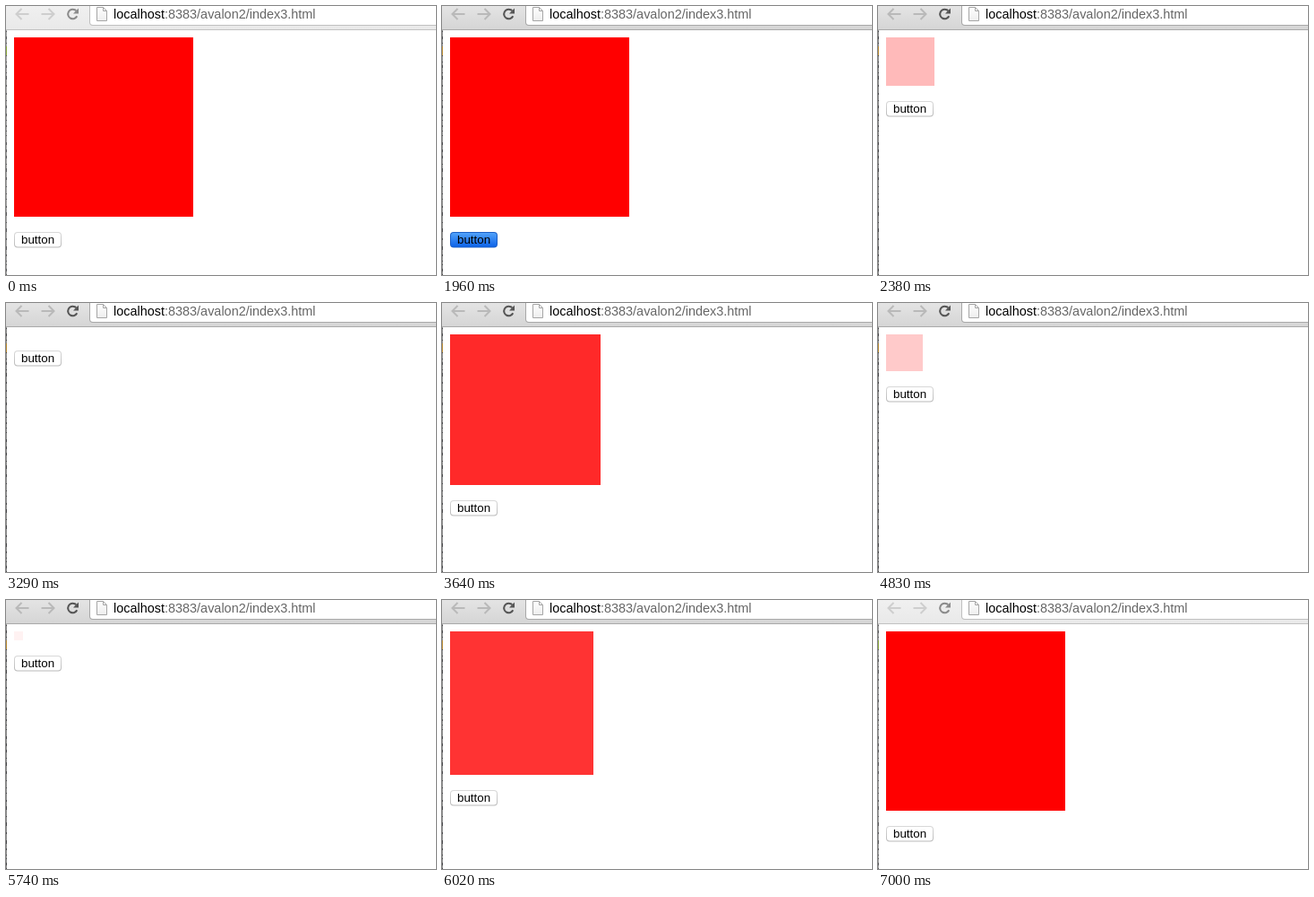
Animation, 480 px wide and 300 px high, one loop 7070 ms. Source, as an HTML page with a canvas:

```html
<!DOCTYPE html>
<html lang="en">
<head>
<meta charset="utf-8">
<title>Toggle box</title>
<style>
html, body { margin: 0; width: 100%; height: 100%; overflow: hidden; background: #fff; }
canvas { display: block; width: 480px; height: 300px; }
</style>
</head>
<body>
<canvas id="stage" width="480" height="300"></canvas>
<script>
const ctx = document.getElementById('stage').getContext('2d');
const LOOP = 7070, TICK = 70, DURATION = 500, FULL = 200;
const FONT = '"Liberation Sans", Arial, sans-serif';

// Each click: button down, button up, animation start, target visibility
const clicks = [
  { down: 1960, up: 2030, start: 2054, show: false },
  { down: 3150, up: 3290, start: 3271, show: true },
  { down: 4340, up: 4480, start: 4480, show: false },
  { down: 5530, up: 5670, start: 5668, show: true }
];

const swing = p => 0.5 - Math.cos(Math.PI * p) / 2;

function boxState(t) {
  let amount = 1, hidden = false;
  for (const c of clicks) {
    if (t < c.start) break;
    const p = Math.min(1, (t - c.start) / DURATION);
    amount = c.show ? swing(p) : 1 - swing(p);
    hidden = !c.show && p === 1;
  }
  return { amount, hidden };
}

function rect(x, y, w, h, fill) {
  ctx.fillStyle = fill;
  ctx.fillRect(x, y, w, h);
}

function vertical(y0, y1, top, bottom) {
  const g = ctx.createLinearGradient(0, y0, 0, y1);
  g.addColorStop(0, top);
  g.addColorStop(1, bottom);
  return g;
}

function rounded(x, y, w, h, r, fill) {
  ctx.beginPath();
  ctx.roundRect(x, y, w, h, r);
  ctx.fillStyle = fill;
  ctx.fill();
}

function text(str, x, y, size, color) {
  ctx.font = size + 'px ' + FONT;
  ctx.fillStyle = color;
  ctx.fillText(str, x, y);
  return ctx.measureText(str).width;
}

function arrow(x, dir, color) {
  ctx.strokeStyle = color;
  ctx.lineWidth = 2;
  ctx.beginPath();
  ctx.moveTo(x - 7 * dir, 9);
  ctx.lineTo(x + 7 * dir, 9);
  ctx.moveTo(x + dir, 3);
  ctx.lineTo(x + 7 * dir, 9);
  ctx.lineTo(x + dir, 15);
  ctx.stroke();
}

function reload(color) {
  ctx.strokeStyle = ctx.fillStyle = color;
  ctx.lineWidth = 2;
  ctx.beginPath();
  ctx.arc(74.5, 9, 5.3, 0.45, 5.5);
  ctx.stroke();
  ctx.beginPath();
  ctx.moveTo(81, 2.5);
  ctx.lineTo(81, 8.5);
  ctx.lineTo(75, 8.5);
  ctx.fill();
}

function pageIcon() {
  ctx.beginPath();
  ctx.moveTo(101.5, 1.5);
  ctx.lineTo(108.5, 1.5);
  ctx.lineTo(112.5, 5.5);
  ctx.lineTo(112.5, 16.5);
  ctx.lineTo(101.5, 16.5);
  ctx.closePath();
  ctx.fillStyle = vertical(2, 17, '#fdfdfd', '#ededed');
  ctx.fill();
  ctx.strokeStyle = '#a6a6a6';
  ctx.lineWidth = 1;
  ctx.stroke();
  ctx.beginPath();
  ctx.moveTo(108.5, 1.5);
  ctx.lineTo(108.5, 5.5);
  ctx.lineTo(112.5, 5.5);
  ctx.stroke();
}

function toolbar(active, iconsActive) {
  rect(0, 0, 480, 26, active ? vertical(0, 26, '#e4e4e4', '#d5d5d5')
                             : vertical(0, 26, '#f0f0f0', '#e9e9e9'));
  rect(0, 26, 480, 1, active ? '#a9a9a9' : '#c2c2c2');
  arrow(18.5, -1, iconsActive ? '#b9b9b9' : '#cecece');
  arrow(46.5, 1, iconsActive ? '#b9b9b9' : '#cecece');
  reload(iconsActive ? '#555' : '#8b8b8b');
  rounded(93, -8, 400, 30, 4, active ? '#a8a8a8' : '#c0c0c0');
  rounded(94, -8, 400, 29, 3, '#fff');
  pageIcon();
  const w = text('localhost', 120, 14, 14.45, '#000');
  text(':8383/avalon2/index3.html', 120 + w, 14, 14.45, '#666');
}

// Sliver of what lies behind the window
function leftEdge(active) {
  rect(0, 27, 1, 273, active ? '#8c8c8c' : '#a2a2a2');
  let seed = 7;
  for (let y = 28; y < 300;) {
    seed = (seed * 73 + 41) % 1009;
    const h = 1 + seed % 4;
    rect(0, y, 1, h, active ? '#48484c' : '#5c5c60');
    y += h + 3 + seed % 5;
  }
  rect(0, 45, 1, 10, active ? '#b98a32' : '#8aa83c');
}

function button(y, pressed) {
  rounded(9, y, 53, 17.5, 4, pressed ? '#1b5fc6' : vertical(y, y + 17, '#d9d9d9', '#b9b9b9'));
  rounded(10, y + 1, 51, 15.5, 3, pressed ? vertical(y, y + 17, '#55a6fb', '#0b61e8') : '#fff');
  text('button', 17, y + 13, 13.33, '#000');
}

function draw(t) {
  rect(0, 0, 480, 300, '#fff');
  const active = t >= 980 && t < 6930;
  toolbar(active, t >= 1050 && t < 7000);
  leftEdge(active);

  const { amount, hidden } = boxState(t);
  const size = Math.round(FULL * amount);
  if (!hidden) rect(9, 35, size, size, `rgba(255,0,0,${amount})`);
  button(hidden ? 44 : 52 + size, clicks.some(c => t >= c.down && t < c.up));
}

const origin = performance.now();
function loop() {
  const t = (performance.now() - origin) % LOOP;
  draw(Math.floor(t / TICK) * TICK);
  requestAnimationFrame(loop);
}
loop();
</script>
</body>
</html>
```
